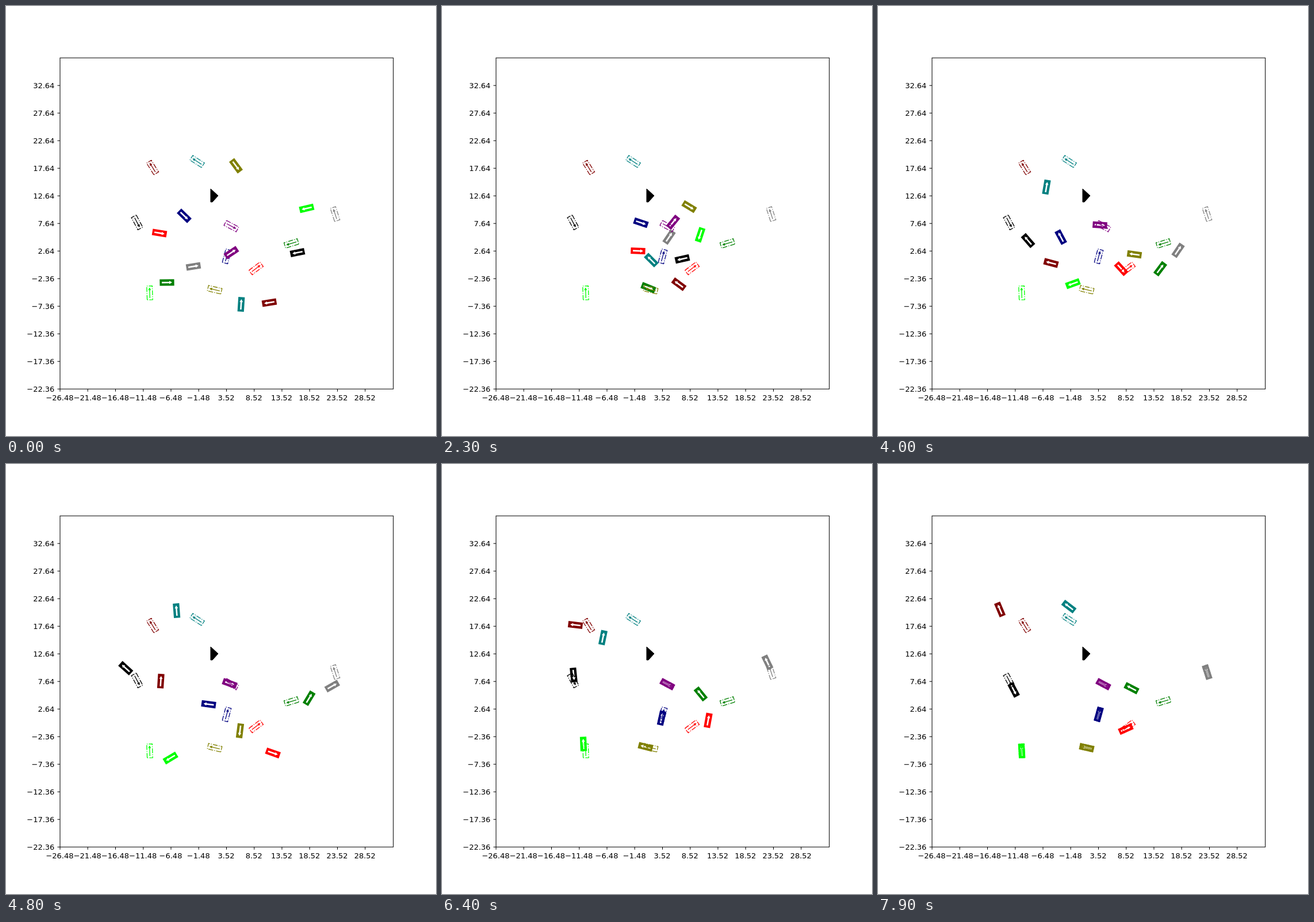
An HTML page that plays this animation: 748x748 px, repeating every 8 s.

```html
<!DOCTYPE html>
<html lang="en">
<head>
<meta charset="utf-8">
<style>
  html, body { margin: 0; width: 100%; height: 100%; overflow: hidden; background: #fff; }
  svg { display: block; width: 100vw; height: 100vh; }
  text { font: 13px "DejaVu Sans", sans-serif; }
  .axes { fill: none; stroke: #000; stroke-width: 1.04; }
</style>
</head>
<body>
<svg id="stage" viewBox="0 0 748 748"></svg>
<script>
const stage = document.getElementById('stage');
const STEP = 100, LOOP = 8000, RAD = Math.PI / 180;
const TIMES = [0, 22, 39, 55, 63, 78];  // steps at which the waypoints are reached
const CRUISE = 7.5, FAST_LEG = 2;       // least speed on the leg with the wide turns
const cars = [];

function make(tag, attrs, text) {
  const el = document.createElementNS('http://www.w3.org/2000/svg', tag);
  for (const name in attrs) el.setAttribute(name, attrs[name]);
  if (text) el.textContent = text;
  return el;
}
const add = (parent, ...args) => parent.appendChild(make(...args));

const place = (el, { x, y, turn }) =>
  el.setAttribute('transform', `translate(${x.toFixed(2)} ${y.toFixed(2)}) rotate(${turn.toFixed(2)})`);

function drawAxes() {
  const left = 94, right = 673.7, top = 90.2, bottom = 666.2;
  const label = v => v.toFixed(2).replace('-', '\u2212');
  let lines = `M${left} ${top}H${right}V${bottom}H${left}Z`;
  for (let i = 0; i < 12; i++) {
    const x = left + 48.25 * i, y = bottom - 48 * i;
    lines += `M${x} ${bottom}v4.5M${left} ${y}h-4.5`;
    add(stage, 'text', { x: x - .5, y: 685.5, 'text-anchor': 'middle' }, label(-26.48 + 5 * i));
    add(stage, 'text', { x: 84.4, y: y + 4.8, 'text-anchor': 'end' }, label(-22.36 + 5 * i));
  }
  add(stage, 'path', { class: 'axes', d: lines });
  add(stage, 'path', { d: 'M356 318L369 330L359 341H356Z', stroke: '#000' });
}

function drawCar(color) {
  const g = add(stage, 'g', {});
  add(g, 'rect', { x: -12.6, y: -5.6, width: 25.2, height: 11.2, fill: color });
  add(g, 'path', { d: 'M-9 -1.3H4V-2.9L9 0L4 2.9V1.3H-9Z', fill: '#fff' });
  return g;
}

function drawGoal(color, [x, y, a]) {
  const g = add(stage, 'g', { stroke: color, fill: 'none', 'stroke-width': 1.3 });
  add(g, 'rect', { x: -12, y: -4.8, width: 24, height: 9.6, 'stroke-dasharray': '8.3 2.1 1.3 2.1' });
  add(g, 'path', { d: 'M-9 0H5' });
  add(g, 'path', { d: 'M5 -2L9 0L5 2Z', fill: color, 'stroke-width': .6 });
  place(g, { x, y, turn: -a });
}

// A leg is an arc-like curve that leaves and arrives along the headings.
function planLeg([x0, y0, a0], [x1, y1, a1], minLength) {
  const cos = a => Math.cos(a * RAD), sin = a => Math.sin(a * RAD);
  const chord = Math.hypot(x1 - x0, y1 - y0);
  const course = Math.atan2(y0 - y1, x1 - x0) / RAD;
  const reverse = cos(a0 - a1) > .6 && cos(a0 - course) + cos(a1 - course) < 0;
  const way = reverse ? -1 : 1;
  const off = a => Math.acos(way * cos(a - course));
  let handle = way * chord / 3 / Math.cos((off(a0) + off(a1)) / 4) ** 2;
  const path = make('path', {});
  const bend = () => path.setAttribute('d',
    `M${x0} ${y0}C${x0 + handle * cos(a0)} ${y0 - handle * sin(a0)} ` +
    `${x1 - handle * cos(a1)} ${y1 + handle * sin(a1)} ${x1} ${y1}`);
  bend();
  // A car that must keep its speed swings wider.
  if (chord > 20 && !reverse) {
    while (path.getTotalLength() < minLength) { handle *= 1.04; bend(); }
  }
  return { path, reverse, length: path.getTotalLength(), end: { x: x1, y: y1, turn: -a1 } };
}

// Waypoints are x, y, heading; a car that has arrived stays at its goal.
function car(color, goal, ...points) {
  const stops = TIMES.map((_, i) => points[i] || goal);
  const legs = stops.slice(1).map((stop, i) =>
    planLeg(stops[i], stop, i === FAST_LEG ? CRUISE * (TIMES[i + 1] - TIMES[i]) : 0));
  const el = drawCar(color);
  drawGoal(color, goal);
  cars.push({ el, legs });
}

function poseOn({ path, reverse, length, end }, u) {
  if (length < 1) return end;
  const s = u * length, at = d => path.getPointAtLength(Math.min(length, Math.max(0, d)));
  const p = at(s), back = at(s - .5), front = at(s + .5);
  const turn = Math.atan2(front.y - back.y, front.x - back.x) / RAD + (reverse ? 180 : 0);
  return { x: p.x, y: p.y, turn };
}

drawAxes();
car('black', [228, 376.5, -62],
  [507, 429, 192], [418, 440, 193], [261, 408, 131], [184, 342, -45], [229, 367, -85], [236, 393, -62]);
car('gray', [572.5, 362, 108],
  [326, 453, 9], [395, 402, 56], [522, 425, 56], [575, 354, 161], [566, 345, 115]);
car('red', [435, 456.5, 37],
  [267, 395, -9], [341, 426, -2], [423, 457, -48], [463, 443, 94], [463, 446, 76], [431, 461, 25]);
car('maroon', [255, 281, 122],
  [458, 516, 190], [412, 484, 144], [301, 447, 165], [275, 294, 94], [232, 280, 173], [212, 253, 113]);
car('lime', [250, 499, 92],
  [523, 352, 193], [449, 398, 252], [339, 483, 200], [245, 502, 90], [246, 487, 93]);
car('green', [496.5, 413, 197],
  [280, 481, 1], [359, 490, -22], [491, 457, 53], [485, 412, 206], [450, 400, 129], [441, 390, 154]);
car('olive', [363, 493.5, 167],
  [400, 278, -53], [430, 349, -31], [446, 432, 172], [368, 496, 172], [354, 492, 166]);
car('navy', [384, 435.5, 75],
  [310, 365, -45], [346, 377, -19], [318, 402, 118], [383, 437, 94], [382, 442, 79]);
car('teal', [332.5, 270.5, 147],
  [409, 519, 86], [364, 442, 135], [293, 315, 80], [314, 288, -64], [280, 302, 78], [332, 248, 143]);
car('purple', [392, 383, -28],
  [392, 429, 33], [402, 376, 50], [386, 381, -4]);

function draw(ms) {
  const k = Math.max(0, Math.floor(ms % LOOP / STEP) - 1);
  const leg = Math.max(0, TIMES.findIndex(t => t >= k) - 1);
  let u = (k - TIMES[leg]) / (TIMES[leg + 1] - TIMES[leg]);
  if (leg === 0) u **= 1.7;  // all cars start from rest
  for (const { el, legs } of cars) place(el, poseOn(legs[leg], u));
}

const start = performance.now();
function tick() {
  draw(performance.now() - start);
  requestAnimationFrame(tick);
}
tick();
</script>
</body>
</html>
```
